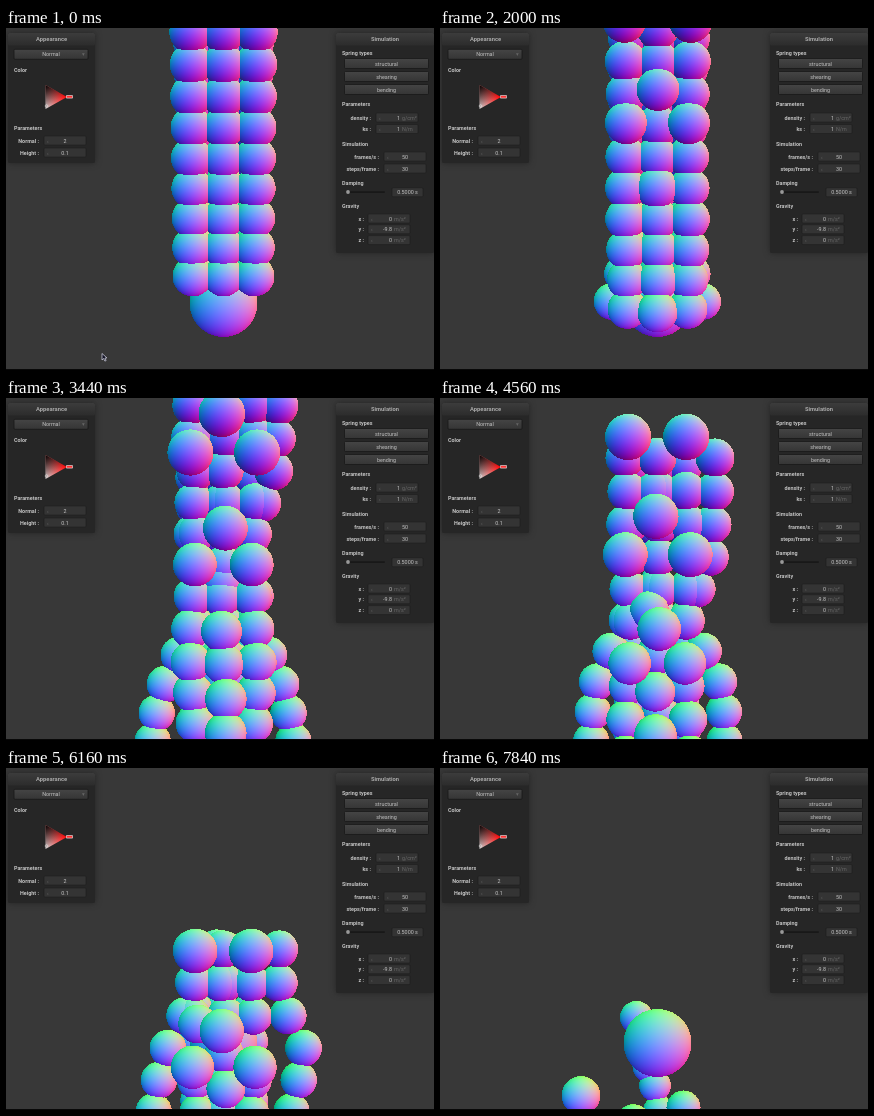
An HTML page with a canvas that plays this animation: 428x342 px, repeating every 7.92 s.

```html
<!DOCTYPE html>
<html lang="en">
<head>
<meta charset="utf-8">
<title>Falling ball tower</title>
<style>
html, body { margin: 0; width: 428px; height: 342px; overflow: hidden; background: #383838; }
canvas, svg, #wheel { position: absolute; left: 0; top: 0; }
svg { font: 5.4px Roboto, "Open Sans", sans-serif; }
.panel { fill: #262626; filter: drop-shadow(0 0 3px #1118); }
.label { fill: #c4c4c4; font-weight: bold; }
.title { fill: #aaa; font-size: 5.8px; font-weight: bold; }
.value { fill: #c4c4c4; }
.dim { fill: #666; }
#wheel {
  left: 27px; top: 49px; width: 39.5px; height: 39.5px; border-radius: 50%;
  background: conic-gradient(from 90deg, red, yellow, lime, cyan, blue, magenta, red);
  -webkit-mask: radial-gradient(circle, transparent 14px, #000 14.8px);
  mask: radial-gradient(circle, transparent 14px, #000 14.8px);
}
</style>
</head>
<body>
<canvas id="stage" width="428" height="342"></canvas>
<div id="wheel"></div>
<svg id="ui" width="428" height="342">
  <defs>
    <linearGradient id="head" x2="0" y2="1"><stop stop-color="#3c3c3c"/><stop offset="1" stop-color="#2c2c2c"/></linearGradient>
    <linearGradient id="key" x2="0" y2="1"><stop stop-color="#454545"/><stop offset="1" stop-color="#353535"/></linearGradient>
    <linearGradient id="tint" x1="1" y1=".5" x2="0" y2="1"><stop stop-color="#f00"/><stop offset="1" stop-color="#ddd"/></linearGradient>
    <linearGradient id="shade" x1=".5" y1=".75" x2="0" y2="0"><stop stop-opacity="0"/><stop offset="1"/></linearGradient>
  </defs>
</svg>
<script>
const W = 428, H = 342, LOOP = 7920, STEP = 80;

// ---- control panels
const ui = document.getElementById("ui");
const add = s => ui.insertAdjacentHTML("beforeend", s);
const rect = (x, y, w, h, more) => add(`<rect x="${x}" y="${y}" width="${w}" height="${h}" ${more}/>`);
const text = (x, y, s, cls = "label", anchor = "start") =>
  add(`<text x="${x}" y="${y + 2}" class="${cls}" text-anchor="${anchor}">${s}</text>`);

function panel(x, w, h, name) {
  rect(x, 5, w, h, 'rx="1.5" class="panel"');
  rect(x, 5, w, 12.5, 'rx="1.5" fill="url(#head)"');
  text(x + w / 2, 11.2, name, "title", "middle");
}
function button(x, y, w, name) {
  rect(x, y, w, 10, 'rx="1" fill="url(#key)" stroke="#181818" stroke-width=".8"');
  text(x + w / 2, y + 5, name, "value", "middle");
}
function box(x, y, w) {
  rect(x, y - 4.5, w, 9, 'rx="1" fill="#343434" stroke="#1e1e1e" stroke-width=".6"');
}
function field(name, right, x, y, value, unit) {
  text(right, y, name + " :", "label", "end");
  box(x, y, 42);
  text(x + 3, y, "‹", "dim");
  if (unit) {
    text(x + 24, y, value, "value", "end");
    text(x + 26, y, unit, "dim");
  } else text(x + 21, y, value, "value", "middle");
}

panel(2, 87, 130, "Appearance");
button(8, 21.3, 74, "Normal");
text(76, 26, "▾", "dim");
text(8, 41.5, "Color");
for (const fill of ["tint", "shade"]) add(`<path d="M61 69L39.5 57V81Z" fill="url(#${fill})"/>`);
add('<circle cx="40.5" cy="78" r="1.3" fill="none" stroke="#ddd" stroke-width=".6"/>');
add('<path d="M60.5 67.5h6v2.6h-6Z" fill="#f33" stroke="#eee" stroke-width=".6"/>');
text(8, 99.5, "Parameters");
field("Normal", 33, 38, 112.5, "2");
field("Height", 33, 38, 124.5, "0.1");

panel(330, 98, 220, "Simulation");
text(336, 24.5, "Spring types");
["structural", "shearing", "bending"].forEach((s, i) => button(338.5, 30.5 + 13 * i, 84, s));
text(336, 76, "Parameters");
field("density", 365, 370, 89.5, "1", "g/cm²");
field("ks", 365, 370, 101, "1", "N/m");
text(336, 115.5, "Simulation");
field("frames/s", 373, 378, 128.5, "50");
field("steps/frame", 373, 378, 140.5, "30");
text(336, 154.5, "Damping");
rect(341, 163.3, 38, 1.6, 'rx=".8" fill="#181818"');
add('<circle cx="342" cy="164" r="1.9" fill="#999"/>');
box(386, 164.3, 31);
text(401.5, 164.3, "0.5000 s", "value", "middle");
text(336, 178, "Gravity");
["0", "-9.8", "0"].forEach((v, i) => field("xyz"[i], 358, 362, 190.5 + 10.8 * i, v, "m/s²"));
add('<path id="cursor" d="M96 325.5v6.5l1.7-1.5 1.2 2.6 1.2-.6-1.2-2.5 2-.1Z" fill="#112" stroke="#dde" stroke-width=".7"/>');
const cursor = document.getElementById("cursor");

// ---- renderer: spheres coloured by their surface normal, with a depth buffer
const FOCAL = 413, MID_X = 217, MID_Y = 171;
const ctx = document.getElementById("stage").getContext("2d");
const image = ctx.createImageData(W, H);
const pixels = new Uint32Array(image.data.buffer);
const depth = new Float32Array(W * H);
const tone = n => Math.round(127.5 * (1 + Math.max(-1, Math.min(1, n))));

function sphere(x, y, z, r) {
  // the line of sight turns the visible side away from the screen axis
  const tilt = (y - MID_Y) / FOCAL, turn = (MID_X - x) / FOCAL;
  const bottom = Math.min(H - 2, y + r);
  for (let py = Math.max(0, Math.ceil(y - r)); py <= bottom; py++) {
    const ny = (y - py) / r;
    for (let px = Math.ceil(x - r); px <= x + r; px++) {
      const nx = (px - x) / r, rest = 1 - nx * nx - ny * ny;
      if (rest < 0) continue;
      const nz = Math.sqrt(rest), i = py * W + px;
      if (z + r * nz <= depth[i]) continue;
      depth[i] = z + r * nz;
      const red = tone(nx + nz * turn), green = tone(ny * Math.cos(tilt) + nz * Math.sin(tilt));
      const blue = tone(nz * Math.cos(tilt) - ny * Math.sin(tilt) - nx * turn);
      pixels[i] = (255 << 24 | blue << 16 | green << 8 | red) >>> 0;
    }
  }
}

// ---- motion, with t in seconds
const ROWS = 13, RADIUS = 20, GAP = 31;
const TIMES = [0, 1.28, 2.64, 3.44, 4.56, 6.16, 7.84];
const FALL = [0, 8, 34, 76, 160, 285, 490];
// where the last slow balls are when the loop ends: x, y, r
const STRAGGLERS = [[196, 249, 16.5], [208, 298, 16], [214.5, 317, 16], [194, 352, 14], [140.5, 327, 19.4], [243, 339, 17]];

function ramp(from, to, v) {
  const u = Math.max(0, Math.min(1, (v - from) / (to - from)));
  return u * u * (3 - 2 * u);
}

function fallAt(t) {
  let i = 0;
  while (i < TIMES.length - 2 && t >= TIMES[i + 1]) i++;
  const a = TIMES[i], b = TIMES[i + 1];
  return FALL[i] + (FALL[i + 1] - FALL[i]) * (t * t - a * a) / (b * b - a * a);
}

function towerBall(col, row, layer, t, fall) {
  const loose = ramp(1.3, 3.4, t);
  const y = 248 - 29.3 * row + fall + 1.3 * Math.max(0, t - 1.1) * (ROWS - 1 - row);
  let x = GAP * col + 2.5 * loose * Math.sin(7.3 * row + 5.1 * col + 3.7 * layer);
  let z = -GAP * layer + .105 * (245 - y);

  // every third ball of the front buckles forward, the others sink in
  if (layer == 0) {
    const forward = (row + 3 - (col == 0)) % 3 == 0;
    const buckle = loose * ramp(2, 8, row);
    z += buckle * (forward ? 36 : -29);
    if (forward) x *= 1 - .13 * buckle;
  }
  // balls above the flanks of the big sphere slide outwards
  if ((col == 0) != (layer == 1)) {
    const slide = 48 * ramp(1.2, 2.6, t) * (1 - Math.exp(-Math.max(0, y - 240) / 45));
    x += col * slide;
    z += .6 * (1 - layer) * slide;
  }
  // the top of the right side leans out
  if (col == 1 && layer == 1) x += 26 * ramp(1.5, 4, t) * ramp(7, 9, row);

  const s = FOCAL / (FOCAL - z);
  sphere(MID_X + x * s, MID_Y + (y - MID_Y) * s, z, RADIUS * s);
}

function draw(ms) {
  const t = ms / 1000, fall = fallAt(t), done = fall / FALL[FALL.length - 1];
  pixels.fill(0xff383838);
  pixels.fill(0xff080808, W * (H - 1));
  depth.fill(-1e9);
  for (let layer = 0; layer < 3; layer++)
    for (let row = 0; row < ROWS; row++)
      for (let col = -1; col < 2; col++) towerBall(col, row, layer, t, fall);
  for (const [x, y, r] of STRAGGLERS)
    sphere(MID_X + (x - MID_X) * done * done, y - 171 * (1 - done), FOCAL * (1 - RADIUS / r), r);
  sphere(MID_X, 274.5, -55, 34);
  ctx.putImageData(image, 0, 0);
  cursor.style.display = ms < STEP ? "" : "none";
}

const begin = performance.now();
let shown = -1;
function tick() {
  const ms = Math.floor((performance.now() - begin) % LOOP / STEP) * STEP;
  if (ms !== shown) draw(shown = ms);
  requestAnimationFrame(tick);
}
tick();
</script>
</body>
</html>
```
